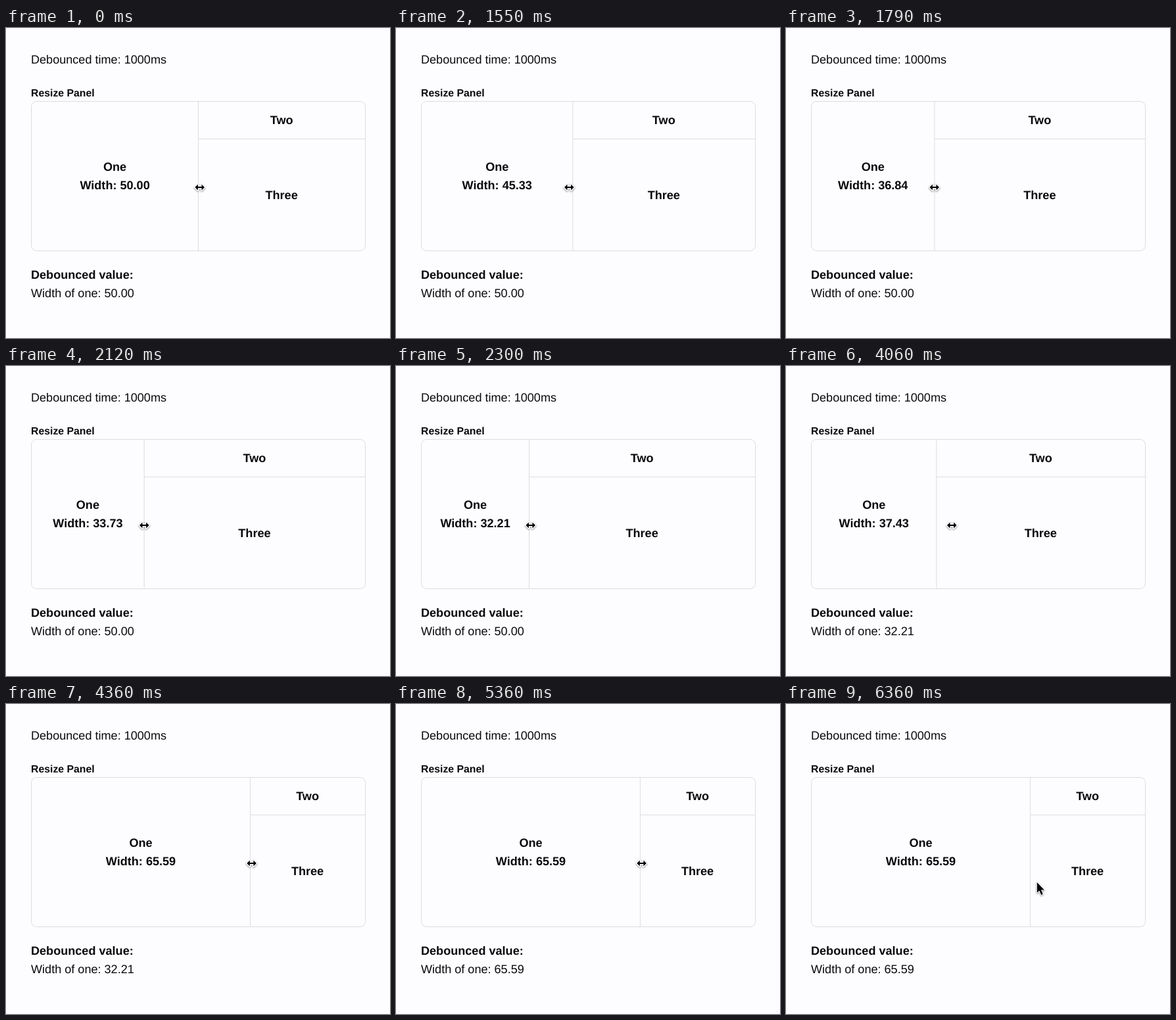
An HTML page that plays this animation: 584x471 px, repeating every 6.39 s.

```html
<!DOCTYPE html>
<html lang="en">
<head>
<meta charset="utf-8">
<title>Debounced resize panel</title>
<style>
  html, body { margin: 0; width: 100%; height: 100%; overflow: hidden; background: #fdfcff; }
  svg { display: block; width: 584px; height: 471px; font: 18.08px "Liberation Sans", Arial, sans-serif;
    fill: #09090b; text-rendering: geometricPrecision; }
  .bold { font-weight: 700; }
  .mid { text-anchor: middle; }
  .small { font-size: 15.82px; }
  .line { fill: none; stroke: #dddce0; stroke-width: 1; }
  .cursor { fill: #000; stroke: #fff; stroke-width: 2; stroke-linejoin: round; paint-order: stroke;
    filter: drop-shadow(0 1px 1px rgba(0, 0, 0, .45)); }
  #resize { stroke-width: 3; }
</style>
</head>
<body>
<svg viewBox="0 0 584 471">
  <text x="38" y="54">Debounced time: 1000ms</text>
  <text class="bold small" x="38" y="103.5">Resize Panel</text>

  <rect class="line" x="38.5" y="111.5" width="508" height="227" rx="8"/>
  <path class="line" id="split"/>
  <g class="bold mid" id="left">
    <text y="217.4">One</text>
    <text y="244.5" id="width"></text>
  </g>
  <g class="bold mid" id="right">
    <text y="146.4">Two</text>
    <text y="260">Three</text>
  </g>

  <text class="bold" x="38" y="381.4">Debounced value:</text>
  <text x="38" y="408.5" id="value"></text>

  <path class="cursor" id="resize" d="M-7.3 0L-2.8 -4.5V-1H2.8V-4.5L7.3 0L2.8 4.5V1H-2.8V4.5Z"/>
  <path class="cursor" id="arrow" d="M0 0V15.8L3.5 12.6L6.3 18.9L8.9 17.8L6.2 11.6H11Z"/>
</svg>
<script>
const LOOP = 6390, LEAD = 40;
const $ = id => document.getElementById(id);

// Panel width in percent over time in ms
const keys = [
  [0, 50], [1290, 50], [1430, 49.6], [1550, 45.33], [1790, 36.84], [1910, 35.7],
  [2120, 33.73], [2300, 32.21], [3960, 32.21], [4360, 65.59], [LOOP, 65.59]
];

const slope = i => (keys[i + 1][1] - keys[i][1]) / (keys[i + 1][0] - keys[i][0]);

// Monotone tangent at a key
function tangent(i) {
  if (i === 0 || i === keys.length - 1) return 0;
  const a = slope(i - 1), b = slope(i);
  return a * b > 0 ? 2 * a * b / (a + b) : 0;
}

function widthAt(t) {
  let i = 0;
  while (i < keys.length - 2 && t >= keys[i + 1][0]) i++;
  const [t0, a] = keys[i], [t1, b] = keys[i + 1];
  const h = t1 - t0, u = Math.min(1, (t - t0) / h), v = 1 - u;
  return a * v * v * (1 + 2 * u) + b * u * u * (3 - 2 * u)
    + h * u * v * (tangent(i) * v - tangent(i + 1) * u);
}

const splitX = p => 39.5 + 5.06 * p;
const move = (el, x, y) => el.setAttribute("transform", `translate(${x.toFixed(2)} ${y})`);
const show = (el, on) => el.setAttribute("visibility", on ? "visible" : "hidden");

function draw(t) {
  const phase = t < 2310 ? 20 : 10;
  const tick = Math.max(0, Math.floor((t - phase) / 30) * 30 + phase);
  const p = widthAt(tick), x = splitX(p);

  $("split").setAttribute("d", `M${x} 112V338M${x} 168.5H546`);
  move($("left"), (39 + x) / 2 - 0.2, 0);
  move($("right"), (x + 546.5) / 2 - 0.4, 0);
  $("width").textContent = "Width: " + p.toFixed(2);

  const settled = t < 3300 ? 50 : t < 5360 ? 32.21 : 65.59;
  $("value").textContent = "Width of one: " + settled.toFixed(2);

  const leaving = t >= 6300;
  show($("resize"), !leaving);
  show($("arrow"), leaving);
  move($("resize"), splitX(widthAt(tick + LEAD)) + 2.2, 242);
  const step = Math.floor((t - 6300) / 30);
  move($("arrow"), 375.8 + 3 * step, 247 + 12 * step);
}

const start = performance.now();
function frame() {
  draw((performance.now() - start) % LOOP);
  requestAnimationFrame(frame);
}
frame();
</script>
</body>
</html>
```
